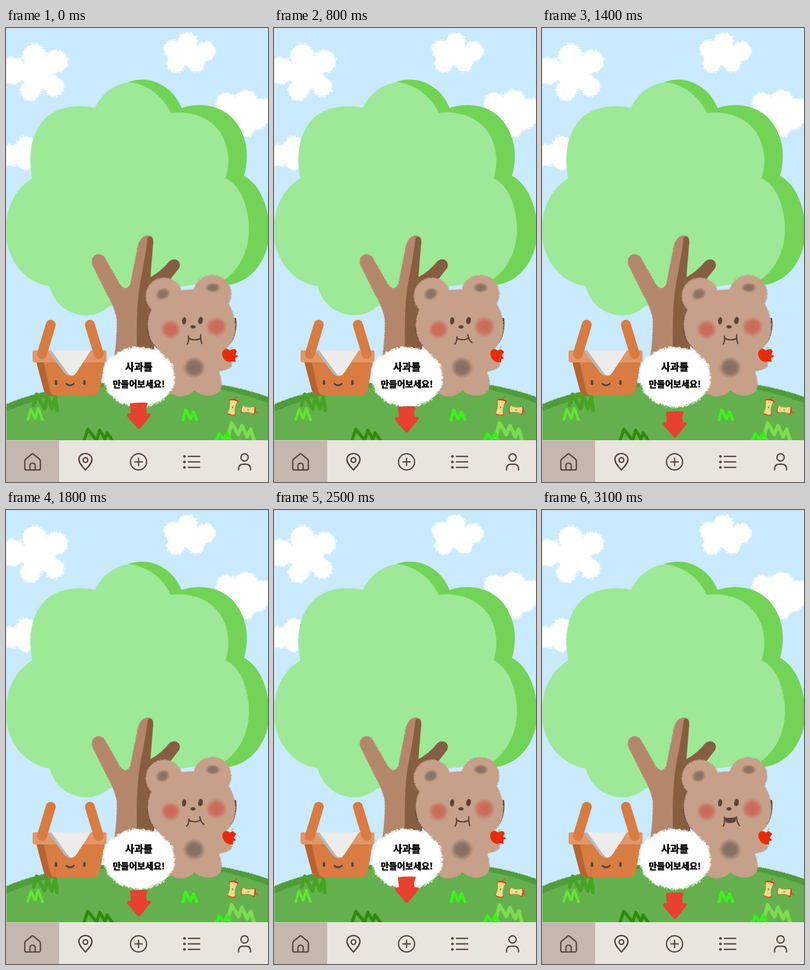
Recreate the animation shown at these times as an HTML page with a canvas. Size 503 by 869 pixels, loop 3.2 s.

```html
<!DOCTYPE html>
<html lang="ko">
<head>
<meta charset="utf-8">
<title>사과를 만들어보세요!</title>
<style>
html, body { margin: 0; width: 100%; height: 100%; overflow: hidden; background: #c9eaff; }
canvas { display: block; width: 503px; height: 869px; }
</style>
</head>
<body>
<canvas id="stage" width="503" height="869"></canvas>
<script>
const W = 503, H = 869, LOOP = 3200;
const stage = document.getElementById('stage').getContext('2d');
let g = stage;

function seeded(seed) {
  return () => (seed = (seed * 16807) % 2147483647) / 2147483647;
}

function layer(draw) {
  const c = document.createElement('canvas');
  c.width = W;
  c.height = H;
  g = c.getContext('2d');
  draw();
  g = stage;
  return c;
}

function fill(d, color) {
  g.fillStyle = color;
  g.fill(new Path2D(d));
}

function line(d, color, width) {
  g.strokeStyle = color;
  g.lineWidth = width;
  g.lineCap = g.lineJoin = 'round';
  g.stroke(new Path2D(d));
}

function oval(x, y, rx, ry, color, turn = 0) {
  g.fillStyle = color;
  g.beginPath();
  g.ellipse(x, y, rx, ry, turn, 0, Math.PI * 2);
  g.fill();
}

function dot(x, y, r, color) { oval(x, y, r, r, color); }

function soft(x, y, rx, ry, rgb, alpha, turn = 0) {
  g.save();
  g.translate(x, y);
  g.rotate(turn);
  g.scale(rx, ry);
  const grad = g.createRadialGradient(0, 0, 0, 0, 0, 1);
  grad.addColorStop(0, `rgba(${rgb},${alpha})`);
  grad.addColorStop(0.55, `rgba(${rgb},${alpha * 0.85})`);
  grad.addColorStop(1, `rgba(${rgb},0)`);
  dot(0, 0, 1, grad);
  g.restore();
}

// Filled path with short bristles along its edge.
function furry(d, color, width, seed) {
  const rnd = seeded(seed);
  const p = new Path2D(d);
  g.fillStyle = g.strokeStyle = color;
  g.fill(p);
  g.save();
  g.lineCap = 'butt';
  g.lineWidth = width;
  g.setLineDash(Array.from({ length: 40 }, () => 0.6 + rnd() * 1.8));
  g.stroke(p);
  g.restore();
}

function chalk(x, y, r, rnd) {
  dot(x, y, r - 2.5, '#fff');
  for (let i = 0; i < r * 6; i++) {
    const a = rnd() * Math.PI * 2, q = r - 4 + rnd() * 4.5;
    dot(x + Math.cos(a) * q, y + Math.sin(a) * q, 0.6 + rnd() * 1.2, 'rgba(255,255,255,.55)');
  }
}

function cloud(puffs, seed) {
  const rnd = seeded(seed);
  puffs.forEach(([x, y, r]) => chalk(x, y, r, rnd));
}

function clouds() {
  cloud([[54, 53, 24], [97, 64, 23], [93, 112, 20], [47, 119, 21], [13, 82, 27], [62, 86, 34]], 11);
  cloud([[349, 28, 20], [383, 45, 20], [365, 67, 18], [326, 67, 19], [321, 41, 19], [350, 50, 25]], 23);
  cloud([[424, 145, 22], [460, 141, 24], [495, 157, 23], [456, 190, 22], [480, 172, 24], [450, 165, 26]], 37);
  cloud([[9, 244, 22], [38, 225, 19], [38, 254, 19]], 41);
}

function tree() {
  fill('M235 103C280 88 322 114 337 153C385 138 431 155 450 194C464 220 466 252 457 283C492 302 507 352 505 396' +
    'C503 440 475 486 425 492L300 480L330 200Z', '#73d357');
  const leaves = 'M171 153C184 126 208 107 238 104C276 110 303 134 316 163C362 157 402 177 417 211C429 238 429 264 421 288' +
    'C450 300 466 344 466 385C466 428 446 464 418 482L300 500L197 533C183 547 163 551 145 549C112 545 91 521 84 494' +
    'C34 487 0 440 0 389C0 341 20 306 51 288C41 241 50 197 78 171C104 149 139 147 171 153Z';
  furry(leaves, '#9de997', 1.5, 5);
  furry('M167 455C160 438 176 427 188 438L218 490Q230 507 239 490L252 425C256 393 282 390 282 410L277 474' +
    'L275 640H207C212 605 214 577 213 556Q207 530 195 511Z', '#b5876a', 2, 7);
  fill('M272 401C282 396 284 404 282 417L277 477Q298 466 313 447C325 436 339 448 332 460L314 483L286 510L284 640H252' +
    'C250 565 251 520 259 480Q268 435 272 401Z', '#875e40');
}

function hill() {
  furry('M0 721C60 694 150 679 250 676C350 672 430 680 504 707V792H0Z', '#4f9d38', 2, 13);
  furry('M0 735C65 706 150 687 250 683C350 679 430 690 504 719V792H0Z', '#64b04e', 2, 17);
}

function grass() {
  line('M53 722L59 701L74 729L80 706L88 729L95 706L98 732', '#48a322', 7);
  line('M42 749L48 730L56 747L62 728L70 750', '#5fea2b', 5);
  line('M340 750L345 731L354 748L360 735L366 749', '#3bf31a', 6);
  line('M149 792L157 768L174 789L180 770L190 787L194 775L206 792', '#318a0d', 6);
  line('M426 784L433 756L446 778L453 761L463 782L470 768L476 789', '#7ddc4f', 7);
  line('M403 791L410 777L418 788L425 776L432 791', '#35f31a', 6);
}

function core(x, y, turn, size) {
  g.save();
  g.translate(x, y);
  g.rotate(turn);
  g.scale(size, size);
  line('M1 -15Q3 -21 6 -23', '#b4543b', 1.3);
  fill('M-10 -14Q0 -20 11 -14L8 -10H-8Z', '#e3361c');
  fill('M-9 14Q0 19 9 14L7 10H-7Z', '#e3361c');
  fill('M-8 -13Q0 -15 8 -13Q2 0 7 13Q0 17 -8 13Q-3 0 -8 -13Z', '#f4d98a');
  oval(0, 0, 1.2, 2.4, '#a9743f');
  g.restore();
}

function basket() {
  fill('M58 638H190L180 691Q177 703 166 703H86Q75 703 72 691Z', '#d97c41');
  fill('M58 638H72L84 691Q87 703 95 703H86Q75 703 72 691Z', '#b8642f');
  fill('M54 617H190Q193 617 193 620V635Q193 640 188 640H56Q51 640 51 635V620Q51 617 54 617Z', '#e29767');
  fill('M80 617H163L136 658Q126 673 113 661Z', '#b9b8be');
  fill('M87 617H163L136 658Q128 671 119 661Z', '#ececeb');
  line('M86 568L69 624M161 568L178 624', '#d97c41', 19);
  line('M96 676V681M150.500 676V681', '#43454e', 4.5);
  line('M116 681Q123 687 130 681', '#43454e', 3.5);
}

function nav() {
  g.fillStyle = '#e9e4de';
  g.fillRect(0, 789, W, 80);
  g.fillStyle = '#c4b7ad';
  g.fillRect(0, 789, 102, 80);
  g.fillStyle = 'rgba(255,255,255,.4)';
  g.fillRect(0, 789, W, 1);
  const ink = '#55433b';
  line('M36 829Q36 827 38 825L49 816Q51 814 53 816L64 825Q66 827 66 829V843Q66 846 63 846H39Q36 846 36 843Z' +
    'M46 845V838Q46 833 51 833Q56 833 56 838V845', ink, 2.5);
  line('M152.500 846C147 840 140 833 140 826A12.500 11.500 0 0 1 165 826C165 833 158 840 152.500 846Z' +
    'M157 827A4.500 4.500 0 1 1 148 827A4.500 4.500 0 1 1 157 827', ink, 2.7);
  line('M270 830.500A15.500 15.500 0 1 1 239 830.500A15.500 15.500 0 1 1 270 830.500M247.500 830.500H261.500M254.500 823.500V837.500', ink, 2.4);
  [820, 830.5, 841].forEach(y => {
    dot(342.5, y, 2.5, ink);
    line(`M350 ${y}H372`, ink, 2.3);
  });
  line('M465 822A7 7 0 1 1 451 822A7 7 0 1 1 465 822M446.500 846V843Q447 835 455 835H461Q469 835 469.500 843V846', ink, 2.5);
}

const scene = layer(() => {
  g.fillStyle = '#c9eaff';
  g.fillRect(0, 0, W, H);
  clouds();
  tree();
  hill();
  grass();
  core(435, 726, 0.15, 0.95);
  core(465, 731, 1.65, 0.85);
  basket();
  g.fillStyle = 'rgba(215,215,232,.8)';
  g.fillRect(0, 0, 1, 789);
  g.fillRect(0, 0, W, 1);
  nav();
});

const wholeApple = {
  body: 'M430 617C421 609 412 618 416 629C419 638 428 641 434 638L441 639L440 632L446 628L440 625L443 619Q440 611 430 617Z',
  leaf: 'M431 615Q431 611 435 612'
};
const bittenApple = {
  body: 'M429 617C420 610 412 619 417 630C420 638 428 641 436 640L436 634L442 632L437 627L442 620L436 615Z',
  leaf: 'M434 615Q433 611 436 610'
};
const poses = {
  rest: {
    seed: 101, apple: wholeApple,
    mouth: 'M348 605Q352 598 350 590M351 594Q362 600 374 594M374 587Q373 597 376 604'
  },
  chew: {
    seed: 211, apple: bittenApple,
    mouth: 'M347 605Q352 600 351 591M351 594Q364 600 374 593M372 587Q374 598 380 602'
  },
  open: {
    seed: 307, apple: bittenApple, gape: true,
    mouth: 'M348 605Q352 598 350 588M351 590Q362 592 373 589M373 587Q374 598 379 604'
  }
};

function bear({ seed, apple, mouth, gape }) {
  const fur = '#c6a088', ink = '#5b4438';
  line('M273 573C273 590 282 605 293 613M440 557C442 577 437 594 430 602', '#51443d', 4);
  furry('M338 513A34.500 34.500 0 1 1 269 513A34.500 34.500 0 1 1 338 513Z', fur, 3, seed);
  furry('M432 509A36 35.500 0 1 1 360 509A36 35.500 0 1 1 432 509Z', fur, 3, seed + 1);
  furry('M273 570C273 545 286 518 312 509C337 500 371 498 396 504C424 511 439 545 440 570C440 592 432 606 421 615' +
    'C430 626 435 640 432 648C424 656 412 655 408 658C413 668 415 681 412 690C407 706 375 708 362 692' +
    'C350 708 319 710 312 690C311 670 312 650 308 640C303 627 297 619 289 611C278 600 273 586 273 570Z', fur, 2.5, seed + 2);
  soft(301, 509, 15, 12, '125,101,88', 0.85, -0.5);
  soft(397, 497, 15, 10, '125,101,88', 0.85);
  soft(361, 650, 22, 21, '123,101,89', 0.9);
  soft(316, 577, 20, 19, '205,91,78', 0.85);
  soft(404, 572, 21, 20, '205,91,78', 0.85);
  oval(342, 560.5, 4, 7, ink, 0.1);
  oval(373.5, 560, 4.5, 7, ink, 0.2);
  oval(359, 572, 5, 3.3, ink);
  if (gape) fill('M351 589Q362 591 373 588L371 597Q362 601 353 598Z', ink);
  line(mouth, ink, 2.6);
  fill(apple.body, '#e92c08');
  line(apple.leaf, '#8ecb58', 1.6);
}

const bears = {};
for (const name in poses) bears[name] = layer(() => bear(poses[name]));

const bubble = layer(() => {
  const rnd = seeded(77);
  oval(255.5, 668, 65, 54, '#fff');
  for (let i = 0; i < 46; i++) {
    const a = i / 46 * Math.PI * 2;
    chalk(255.5 + Math.cos(a) * 61, 668 + Math.sin(a) * 50, 7.5 + rnd() * 2, rnd);
  }
});

function words(text, y, size) {
  g.fillStyle = g.strokeStyle = '#050505';
  g.textAlign = 'center';
  g.textBaseline = 'middle';
  g.lineWidth = 0.7;
  g.lineJoin = 'round';
  g.font = `700 ${size}px "Noto Sans CJK KR", "Noto Sans CJK", sans-serif`;
  g.fillText(text, 255, y);
  g.strokeText(text, 255, y);
}

function arrow(tip) {
  g.save();
  g.translate(255, tip);
  const d = 'M-16 -48Q0 -50 16 -49L13 -39L14 -29L22 -28Q22 -26 20 -24L2 -2Q0 0 -2 -2L-21 -24Q-22 -26 -21 -28L-14 -29L-15 -38Z';
  fill(d, '#e8412f');
  line(d, '#e8412f', 2);
  g.restore();
}

// cubic-bezier(.25, .1, .25, 1)
function ease(x) {
  let lo = 0, hi = 1;
  const curve = (a, b, s) => 3 * a * s * (1 - s) ** 2 + 3 * b * s * s * (1 - s) + s ** 3;
  for (let i = 0; i < 24; i++) {
    const mid = (lo + hi) / 2;
    if (curve(0.25, 0.25, mid) < x) lo = mid; else hi = mid;
  }
  return curve(0.1, 1, lo);
}

function arrowTip(t) {
  const p = ((t - 340 + 2000) % 2000) / 1000;
  return 743.5 + 40.5 * ease(p < 1 ? p : 2 - p);
}

function poseAt(t) {
  const p = t % 1000;
  if (p >= 100 && p < 350) return 'open';
  if (p >= 600 && p < 850) return 'chew';
  return 'rest';
}

function frame(now) {
  const t = Math.floor((now % LOOP) / 100) * 100;
  g.drawImage(scene, 0, 0);
  g.drawImage(bears[poseAt(t)], 0, 0);
  g.drawImage(bubble, 0, 0);
  words('사과를', 649, 19);
  words('만들어보세요!', 682, 17);
  arrow(arrowTip(t));
  requestAnimationFrame(frame);
}

frame(0);
</script>
</body>
</html>
```
